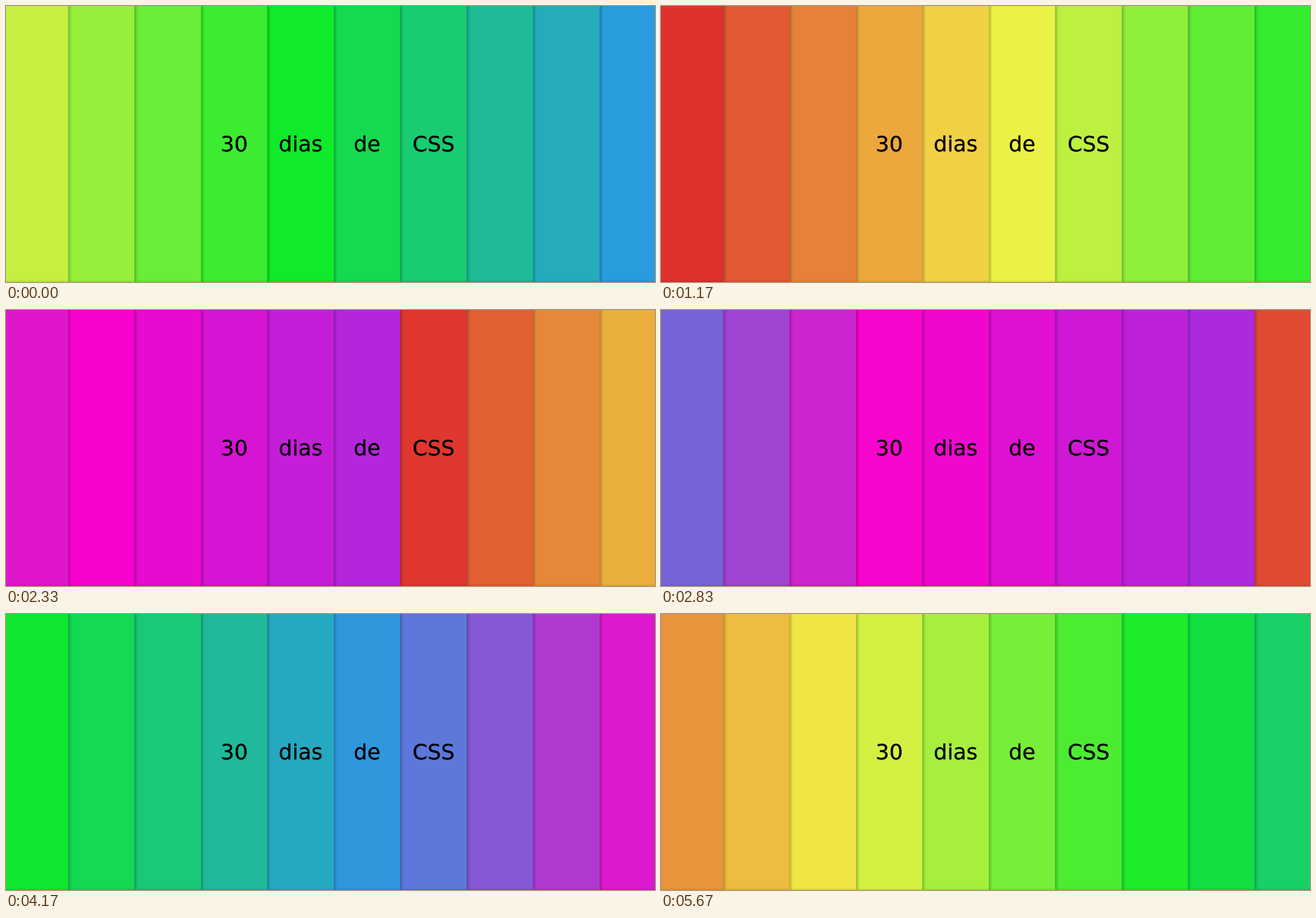
Write an HTML page that moves like this. It is 1148 by 488 pixels and loops after 5840 ms.

```html
<!DOCTYPE html>
<html lang="pt">
<head>
<meta charset="utf-8">
<title>30 dias de CSS</title>
<style>
  html, body { margin: 0; width: 100%; height: 100%; overflow: hidden; }
  body { position: relative; }
  .strip {
    position: absolute;
    top: -8px;
    width: 118px;
    height: 496px;
    box-shadow: inset 3px 0 4px rgba(0, 0, 0, .25);
    font: 38px/504px "DejaVu Sans", sans-serif;
    -webkit-text-stroke: .4px #000;
    text-align: center;
    color: #000;
  }
</style>
</head>
<body>
<script>
  const LOOP = 5840, STEP = 1000 / 6, LAST_STEP = 34;
  const ROUNDING = 5; // steps start on whole hundredths of a second
  const CYCLE = 5000, DELAY = 200, START = 1200;
  const STRIP_WIDTH = 117.55, FIRST_LEFT = -8;

  // Violet, pink, blue, green, yellow, red; the cycle then jumps back to violet.
  const stops = [
    [169, 43, 223], [254, 0, 203], [41, 156, 222],
    [15, 234, 42], [242, 242, 71], [222, 42, 45]
  ];
  const words = ["", "", "", "30", "dias", "de", "CSS", "", "", ""];

  const strips = words.map((word, i) => {
    const strip = document.createElement("div");
    strip.className = "strip";
    strip.style.left = FIRST_LEFT + i * STRIP_WIDTH + "px";
    strip.textContent = word;
    document.body.append(strip);
    return strip;
  });

  function colorAt(time) {
    const phase = ((time - START) % CYCLE + CYCLE) % CYCLE;
    const position = phase / CYCLE * (stops.length - 1);
    const index = Math.floor(position);
    const mix = stops[index].map((from, c) =>
      Math.round(from + (stops[index + 1][c] - from) * (position - index)));
    return `rgb(${mix})`;
  }

  function draw() {
    const elapsed = performance.now() % LOOP;
    const step = Math.min(LAST_STEP, Math.floor((elapsed + ROUNDING) / STEP));
    strips.forEach((strip, i) => {
      strip.style.backgroundColor = colorAt(step * STEP - i * DELAY);
    });
    requestAnimationFrame(draw);
  }
  draw();
</script>
</body>
</html>
```
